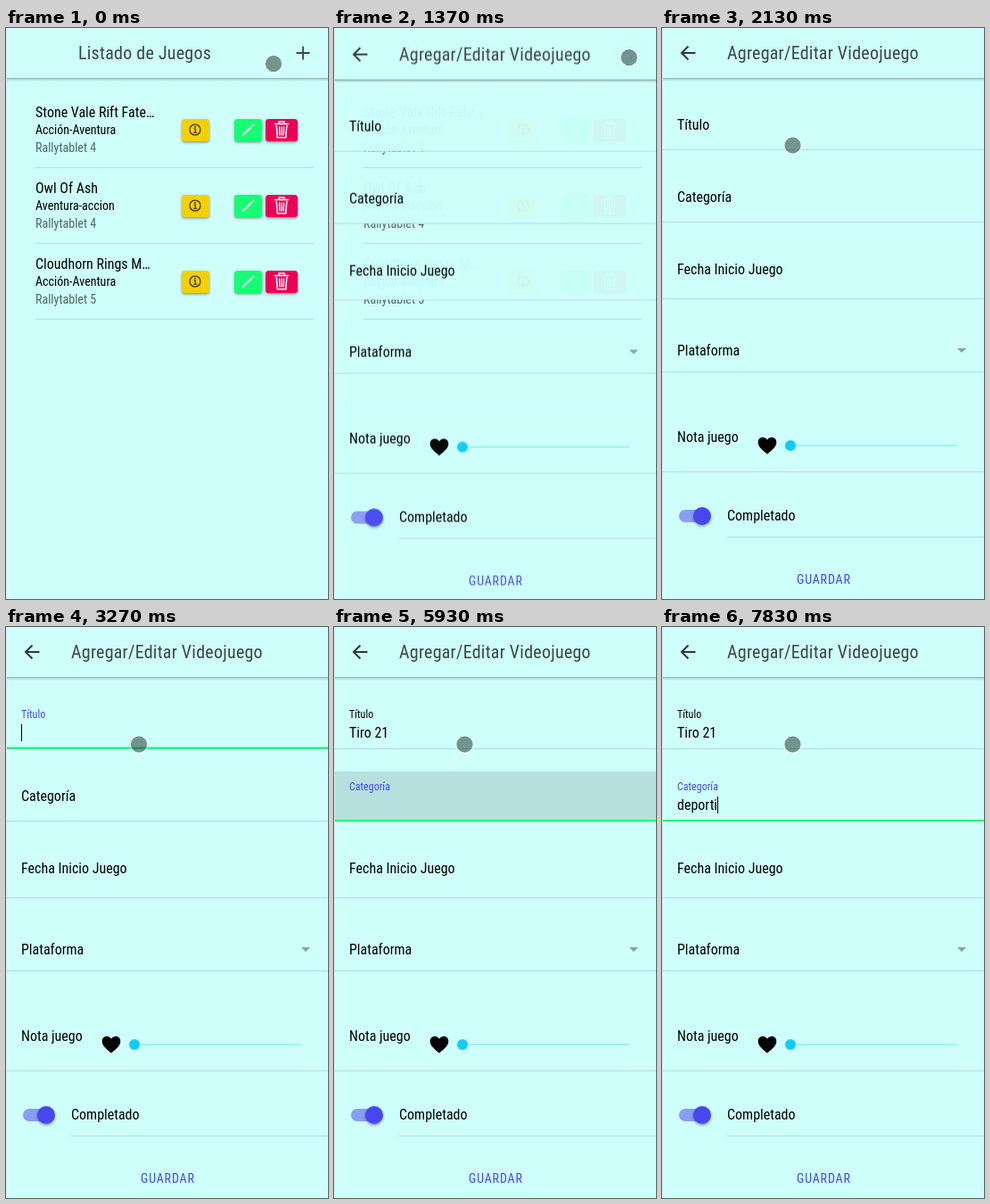
Write an HTML page with a canvas that moves like this. It is 361x640 px and loops after 8 s.

```html
<!DOCTYPE html>
<html lang="es">
<head>
<meta charset="utf-8">
<title>Listado de Juegos</title>
<style>
  html, body { margin: 0; width: 100%; height: 100%; overflow: hidden; background: #cefffb; }
  canvas { display: block; width: 361px; height: 640px; }
</style>
</head>
<body>
<canvas id="stage"></canvas>
<script>
const W = 361, H = 640, LOOP = 8000;
const BG = '#cefffb', INK = '#000', TITLE = '#3b4645', BLUE = '#4747f2', GREEN = '#14fa72';
const LINE = 'rgba(0,0,0,.13)';
const FONT = '"Roboto Condensed", Roboto, sans-serif';
const dpr = window.devicePixelRatio || 1;

function makeLayer(canvas) {
  canvas.width = W * dpr;
  canvas.height = H * dpr;
  const ctx = canvas.getContext('2d');
  ctx.scale(dpr, dpr);
  return ctx;
}
const main = makeLayer(document.getElementById('stage'));
const layer = makeLayer(document.createElement('canvas'));
let g = main;

// ---- text ----
function setFont(size, spacing = 0, family = FONT, stretch = 'condensed') {
  g.font = `${size}px ${family}`;
  g.fontStretch = stretch;
  g.letterSpacing = spacing + 'px';
}

// Without a condensed cut, the regular face is narrowed by one common ratio.
const narrow = (() => {
  const sample = 'Agregar juego';
  setFont(40, 0, 'Roboto, sans-serif', 'normal');
  const full = g.measureText(sample).width;
  setFont(40);
  return g.measureText(sample).width / full > 0.95 ? 0.882 : 1;
})();

function textWidth(s, size) {
  setFont(size);
  return g.measureText(s).width * narrow;
}

function text(s, x, y, size, color = INK, spacing = 0, align = 'left') {
  g.save();
  setFont(size, spacing);
  g.textAlign = align;
  g.fillStyle = color;
  g.translate(x, y);
  g.scale(narrow, 1);
  g.fillText(s, 0, 0);
  g.restore();
}

// ---- shapes ----
function rect(x, y, w, h, color) {
  g.fillStyle = color;
  g.fillRect(x, y, w, h);
}

function disc(x, y, r, color) {
  g.fillStyle = color;
  g.beginPath();
  g.arc(x, y, r, 0, Math.PI * 2);
  g.fill();
}

function pill(x, y, w, h, r, color) {
  g.fillStyle = color;
  g.beginPath();
  g.roundRect(x, y, w, h, r);
  g.fill();
}

function stroke(d, color, width, cap = 'butt') {
  g.strokeStyle = color;
  g.lineWidth = width;
  g.lineCap = cap;
  g.stroke(new Path2D(d));
}

function withShadow(blur, dy, draw) {
  g.save();
  g.shadowColor = 'rgba(0,0,0,.4)';
  g.shadowBlur = blur * dpr;
  g.shadowOffsetY = dy * dpr;
  draw();
  g.restore();
}

// ---- timing ----
const clamp = v => Math.min(1, Math.max(0, v));
const phase = (t, start, length) => clamp((t - start) / length);
const mix = (a, b, p) => a + (b - a) * p;

function bezier(x1, y1, x2, y2) {
  const at = (a, b, s) => 3 * (1 - s) * (1 - s) * s * a + 3 * (1 - s) * s * s * b + s * s * s;
  return x => {
    let lo = 0, hi = 1;
    for (let i = 0; i < 24; i++) {
      const mid = (lo + hi) / 2;
      if (at(x1, x2, mid) < x) lo = mid; else hi = mid;
    }
    return at(y1, y2, lo);
  };
}
const pageEase = bezier(0.36, 0.66, 0.04, 1);
const floatEase = bezier(0.4, 0, 0.2, 1);

// ---- shared header ----
function header(title, x) {
  const fade = g.createLinearGradient(0, 56, 0, 60);
  fade.addColorStop(0, 'rgba(0,0,0,.32)');
  fade.addColorStop(0.4, 'rgba(0,0,0,.13)');
  fade.addColorStop(1, 'rgba(0,0,0,0)');
  rect(0, 0, W, 56, BG);
  rect(0, 56, W, 4, fade);
  text(title, x, 35, 20, TITLE, 0.25);
}

// ---- list page ----
const games = [
  ['Stone Vale Rift Fate…', 'Acción-Aventura', 'Rallytablet 4'],
  ['Owl Of Ash', 'Aventura-accion', 'Rallytablet 4'],
  ['Cloudhorn Rings M…', 'Acción-Aventura', 'Rallytablet 5'],
];

function button(x, w, color) {
  withShadow(3, 1.5, () => pill(x, 102, w, 25, 3.5, color));
}

function infoIcon() {
  g.strokeStyle = '#22210a';
  g.lineWidth = 1.1;
  g.beginPath();
  g.arc(212, 114, 6, 0, Math.PI * 2);
  g.stroke();
  stroke('M210.5 113H212.3V117.2M210.3 117.3H214.2', '#22210a', 1.1);
  disc(212, 110.7, 0.9, '#22210a');
}

function trashIcon() {
  stroke('M301.5 107.5H316.5M306 107V105H312V107', '#fff', 1.5, 'round');
  stroke('M303.2 109L304.3 122.7H313.7L314.8 109', '#fff', 1.6);
  stroke('M306.5 110.5L306.9 120.5M309 110.5V120.5M311.5 110.5L311.1 120.5', '#fff', 1.3);
}

function listPage(t) {
  rect(0, 0, W, H, BG);
  header('Listado de Juegos', 81);
  stroke('M325.5 28H340.5M333 20.5V35.5', TITLE, 1.8);
  games.forEach(([name, genre, platform], i) => {
    g.save();
    g.translate(0, i * 85);
    text(name, 33, 100, 16);
    text(genre, 33, 119, 14);
    text(platform, 33, 139, 14, 'rgba(0,0,0,.6)');
    button(197, 31, '#f5d000');
    button(256, 31, '#14ff74');
    button(291, 36, '#ec0055');
    infoIcon();
    stroke('M265 120.5L275.5 110.5', '#fff', 2.2);
    stroke('M276.5 109.5L278 108', '#fff', 2.2);
    trashIcon();
    rect(33, 156, 312, 1, LINE);
    g.restore();
  });
  const grow = phase(t, 950, 225);
  if (grow > 0) disc(333, 28, mix(10, 24, grow), `rgba(0,0,0,${0.16 * phase(t, 950, 75)})`);
}

// ---- form page ----
const typed = (start, list) => list.map(([at, value]) => ({ at: at + start, value }));
const fields = [
  { label: 'Título', y: 0, focus: 2270, blur: 5400, glow: [134.5, 2.5, '#34ea86'],
    keys: typed(2270, [[0, ''], [1100, 'T'], [1230, 'Ti'], [1460, 'Tir'], [1560, 'Tiro'],
                       [2360, 'Tiro '], [2500, 'Tiro 2'], [2600, 'Tiro 21']]) },
  { label: 'Categoría', y: 81, focus: 5430, blur: Infinity, glow: [135, 2, GREEN], tabbed: true,
    keys: typed(5430, [[0, ''], [1200, 'd'], [1340, 'de'], [1540, 'dep'], [1600, 'depor'],
                       [1800, 'deport'], [2000, 'deporto'], [2270, 'deport'], [2400, 'deporti']]) },
];

function field(f, t) {
  const active = t >= f.focus && t < f.blur;
  const up = floatEase(phase(t, f.focus, 150));
  const key = f.keys.filter(k => k.at <= t).pop();
  g.save();
  g.translate(0, f.y);
  rect(1, 81, 360, 56, BG);
  if (f.tabbed) {
    const shade = 0.12 * (phase(t, f.focus, 100) - phase(t, 6630, 180));
    if (shade > 0) rect(1, 81, 360, 54, `rgba(0,0,0,${shade})`);
  }
  rect(1, 136, 360, 1, LINE);
  text(f.label, 17, mix(114, 102, up), mix(16, 12, up), active ? BLUE : INK);
  if (key) text(key.value, 17, 124, 16);
  if (active) {
    const [y, h, color] = f.glow;
    g.globalAlpha *= phase(t, f.focus, 130);
    rect(1, y, 360, h, color);
    g.globalAlpha = 1;
    const lit = Math.floor((t - key.at) / 500) % 2 === 0;
    if (lit) rect(Math.round(17 + textWidth(key.value, 16)), 109, 1, 19, INK);
  }
  g.restore();
}

function item(label, top, bottom, base, x = 17, lineX = 1) {
  rect(1, top, 360, bottom - top, BG);
  rect(lineX, bottom, W - lineX, 1, LINE);
  text(label, x, base, 16);
}

function heart(x, y) {
  g.fillStyle = INK;
  g.save();
  g.translate(x, y);
  g.fill(new Path2D('M0 -6.3C-1.3 -8.3 -3.1 -9.2 -5.1 -9.2C-8 -9.2 -10.3 -6.9 -10.3 -3.8' +
    'C-10.3 2.3 -3.6 5.9 0 9.7C3.6 5.9 10.3 2.3 10.3 -3.8C10.3 -6.9 8 -9.2 5.1 -9.2C3.1 -9.2 1.3 -8.3 0 -6.3Z'));
  g.restore();
}

function formPage(t) {
  header('Agregar/Editar Videojuego', 73);
  stroke('M37.5 28H22.5M29.5 20.5L22 28L29.5 35.5', '#2f3938', 2);
  fields.forEach(f => field(f, t));
  item('Fecha Inicio Juego', 243, 303, 276);
  item('Plataforma', 330, 385, 367);
  item('Nota juego', 420, 497, 464);
  item('Completado', 515, 570, 552, 73, 73);

  g.fillStyle = 'rgba(0,0,0,.36)';
  g.fill(new Path2D('M331 359H341L336 364Z'));

  heart(118, 468);
  rect(144, 467, 187, 2, '#98f4f8');
  disc(144, 468, 6, '#10cbfb');

  pill(19, 540, 34, 14, 7, '#8b9bf6');
  withShadow(3, 1.5, () => disc(45, 547, 10, BLUE));

  text('GUARDAR', 181.4, 623, 14, BLUE, 0.84, 'center');
}

// ---- pointer ----
const path = [
  [0, 300, 40], [130, 300, 40], [250, 304, 42], [500, 322, 36], [780, 336, 28], [900, 338, 27],
  [970, 336, 28], [1260, 336, 28], [1370, 331, 33], [1480, 310, 40], [1730, 228, 62],
  [1800, 228, 62], [1930, 190, 95], [2030, 160, 122], [2110, 146.5, 131.5],
  [2965, 146.5, 131.5], [2970, 149, 131.5], [3400, 149, 131.5], [3410, 146.5, 131.5], [LOOP, 146.5, 131.5],
];

function pointer(t) {
  const i = path.findIndex(p => p[0] > t);
  const a = path[i - 1], b = path[i];
  const p = phase(t, a[0], b[0] - a[0]);
  const x = mix(a[1], b[1], p), y = mix(a[2], b[2], p);
  disc(x, y, 9.2, 'rgba(40,62,56,.55)');
  g.strokeStyle = 'rgba(255,255,255,.5)';
  g.lineWidth = 1.3;
  g.beginPath();
  g.arc(x, y, 9.9, 0, Math.PI * 2);
  g.stroke();
}

// ---- scene ----
const OPEN = 1212, OPEN_LENGTH = 280;

function draw(t) {
  g = main;
  const raw = phase(t, OPEN, OPEN_LENGTH);
  if (raw < 1) listPage(t);
  else rect(0, 0, W, H, BG);

  if (raw > 0) {
    const p = pageEase(raw);
    g = layer;
    g.clearRect(0, 0, W, H);
    formPage(t);
    g = main;
    g.globalAlpha = mix(0.01, 1, p);
    g.drawImage(layer.canvas, 0, mix(40, 0, p), W, H);
    g.globalAlpha = 1;
  }
  pointer(t);
  rect(0, 0, 1, H, '#dfe8e6');
}

const start = performance.now();
function tick() {
  draw((performance.now() - start) % LOOP);
  requestAnimationFrame(tick);
}
tick();
</script>
</body>
</html>
```
